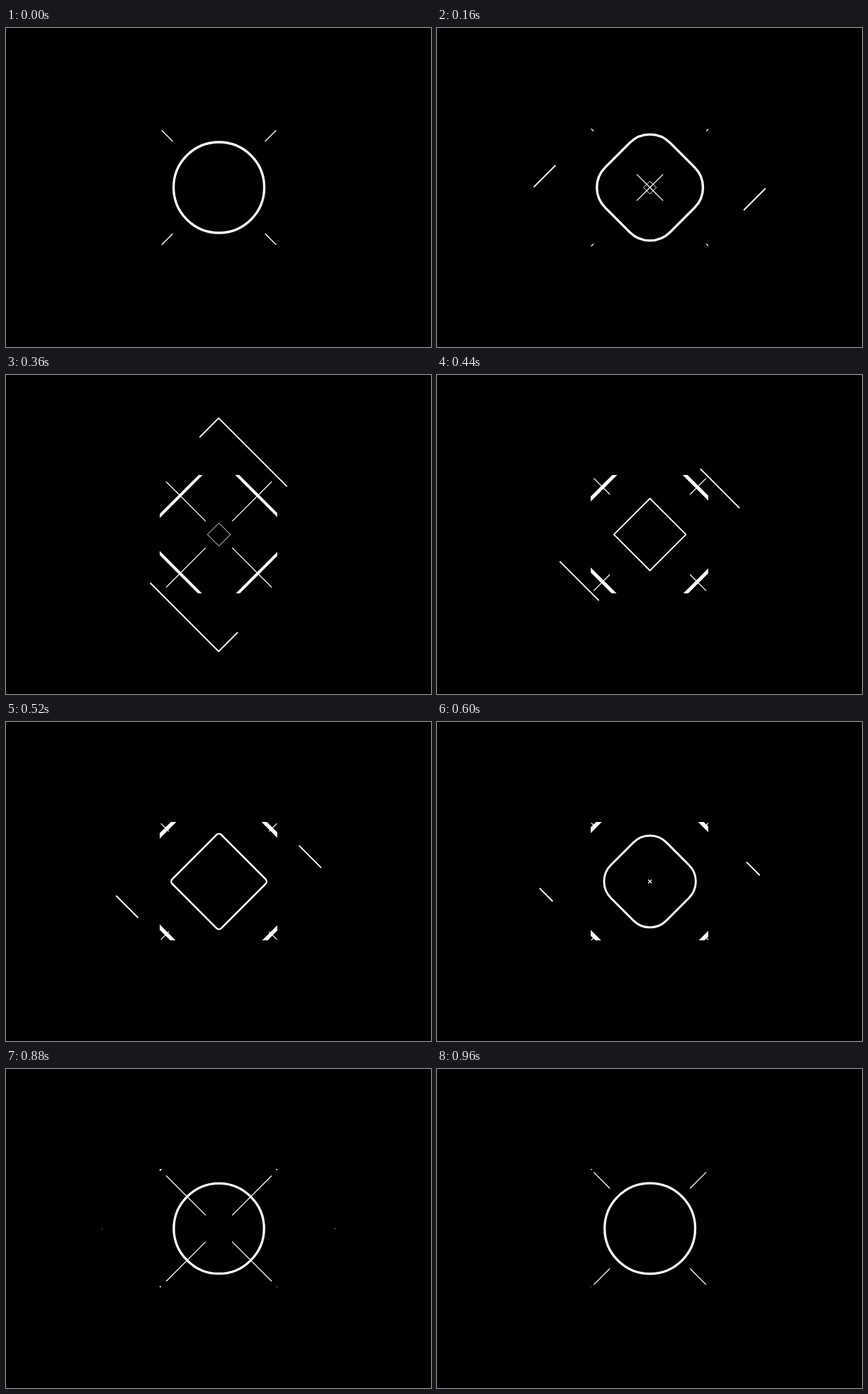
These frames come from a looping animation (600x450 px, 1 s). An HTML page with a canvas:

```html
<!DOCTYPE html>
<html lang="en">
<head>
<meta charset="utf-8">
<title>Circle burst loop</title>
<style>
  html, body { margin: 0; width: 100%; height: 100%; overflow: hidden; background: #000; }
  canvas { display: block; width: 600px; height: 450px; }
</style>
</head>
<body>
<canvas id="stage" width="600" height="450"></canvas>
<script>
const ctx = document.getElementById('stage').getContext('2d');
const LOOP = 1000;
const CX = 300.6, CY = 225;
const SIZE = 64, STROKE = 3.3;
const REACH = 83;
const ORBIT = 164.5;

// cubic-bezier(.5, 0, 0, 1)
function ease(p) {
  if (p <= 0) return 0;
  if (p >= 1) return 1;
  let lo = 0, hi = 1;
  for (let i = 0; i < 24; i++) {
    const s = (lo + hi) / 2;
    if (1.5 * s * (1 - s) ** 2 + s ** 3 < p) lo = s; else hi = s;
  }
  return lo * lo * (3 - 2 * lo);
}

const tween = (t, start, length) => ease((t - start) / length);

function diamond(scale, round) {
  const a = SIZE * scale;
  ctx.save();
  ctx.rotate(Math.PI / 4);
  ctx.lineWidth = Math.max(0.9, STROKE * scale);
  ctx.beginPath();
  ctx.roundRect(-a, -a, 2 * a, 2 * a, a * round);
  ctx.stroke();
  ctx.restore();
}

function rays(t) {
  const head = REACH * tween(t, 0, 640);
  const tail = REACH * tween(t, 200, 640);
  if (head - tail < 0.1) return;
  ctx.lineWidth = 1.3;
  ctx.beginPath();
  for (const sx of [-1, 1]) {
    for (const sy of [-1, 1]) {
      ctx.moveTo(sx * tail, sy * tail);
      ctx.lineTo(sx * head, sy * head);
    }
  }
  ctx.stroke();
}

// Two strokes run half way round a large diamond, opposite each other.
function orbit(t) {
  const head = 2 * tween(t, 4, 800);
  const tail = 2 * tween(t, 125, 800);
  if (head - tail < 0.002) return;
  const stops = [tail, head];
  if (tail < 1 && head > 1) stops.splice(1, 0, 1);
  ctx.lineWidth = 1.9;
  ctx.beginPath();
  for (const side of [1, -1]) {
    stops.forEach((q, i) => {
      const x = side * ORBIT * (q - 1);
      const y = -side * ORBIT * (1 - Math.abs(q - 1));
      if (i) ctx.lineTo(x, y); else ctx.moveTo(x, y);
    });
  }
  ctx.stroke();
}

function draw(t) {
  ctx.fillStyle = '#000';
  ctx.fillRect(0, 0, 600, 450);
  ctx.strokeStyle = '#fff';

  ctx.save();
  ctx.beginPath();
  ctx.rect(217, 141, 166, 167);
  ctx.clip();
  ctx.translate(CX, CY);
  diamond(1 + 0.9 * tween(t, 56, 1200), 1 - tween(t, 0, 560));
  if (t >= 120) diamond(Math.max(0.1, tween(t, 160, 850)), tween(t, 410, 560));
  rays(t);
  rays(t - 520);
  rays(t + LOOP - 520);
  ctx.restore();

  ctx.save();
  ctx.translate(CX - 0.4, CY + 0.3);
  orbit(t);
  ctx.restore();
}

let start;
function tick(now) {
  start ??= now;
  draw((now - start) % LOOP);
  requestAnimationFrame(tick);
}
draw(0);
requestAnimationFrame(tick);
</script>
</body>
</html>
```
